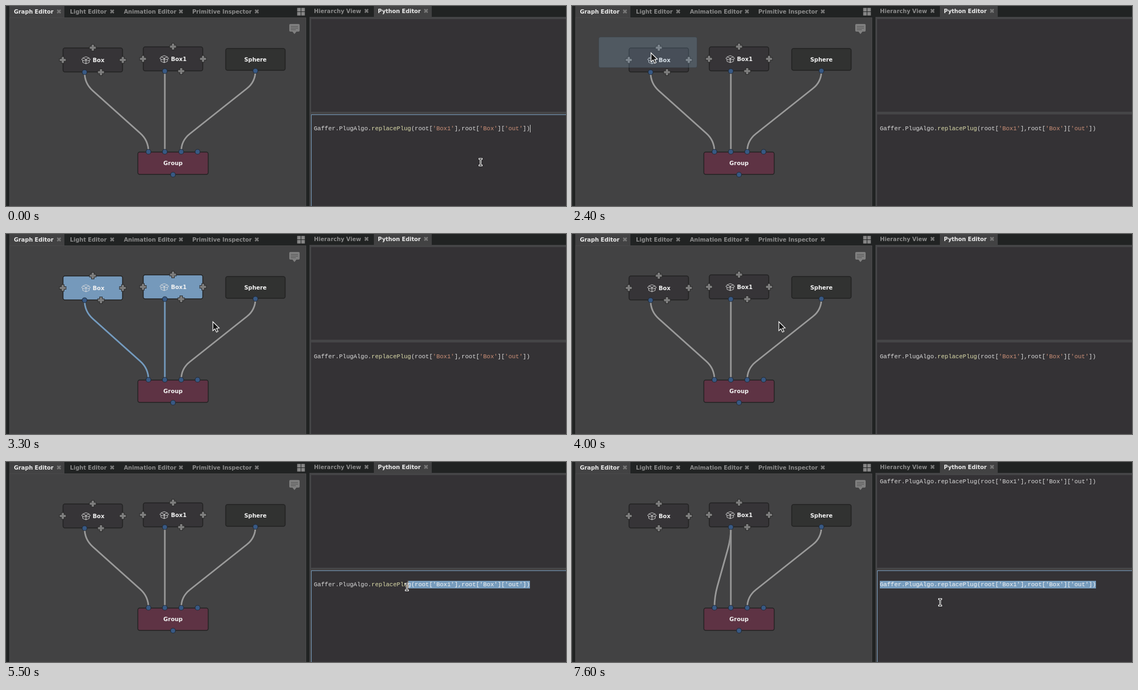
An HTML page with a canvas that plays this animation: 1026 by 367 pixels, repeating every 8000 ms.

```html
<!DOCTYPE html>
<html lang="en">
<head>
<meta charset="utf-8">
<title>Graph and Python editors</title>
<style>
html, body { margin: 0; width: 100%; height: 100%; overflow: hidden; background: #212323; }
canvas { display: block; }
</style>
</head>
<body>
<canvas id="stage" width="1026" height="367"></canvas>
<script>
const g = document.getElementById('stage').getContext('2d');
const LOOP = 8000, STEP = 100;
const UI = '"DejaVu Sans", sans-serif';
const MONO = '11px "Liberation Mono", monospace';
const PANEL = '#424243', FIELD = '#343235', DARK = '#212323', BLUE = '#779cbd';
const CODE_X = 564, CHAR = 6.6;

const CODE_COLOR = { plain: '#dcdcdc', call: '#dcdcaa', string: '#ce9178' };
const LINE = "Gaffer.PlugAlgo.replacePlug(root['Box1'],root['Box']['out'])";
const TOKENS = LINE.split(/('\w+'|\w+(?=\())/);

// Pointer moves: start and end time, and where it goes
const HOME = { x: 869, y: 286 };
const MOVES = [
  { from: 400, to: 1100, x: 995, y: 252 },
  { from: 1400, to: 1700, x: 352, y: 140 },
  { from: 1700, to: 2300, x: 48, y: 55 },
  { from: 2300, to: 2800, x: 379, y: 161 },
  { from: 4300, to: 4700, x: 1019, y: 274 },
  { from: 4900, to: 5000, x: 1014, y: 235 },
  { from: 5000, to: 5200, x: 988, y: 236 },
  { from: 5300, to: 5800, x: 523, y: 224 },
  { from: 6000, to: 6200, x: 674, y: 257 }
];

const clamp = (v, lo, hi) => Math.max(lo, Math.min(hi, v));
const easeOut = k => 1 - (1 - k) ** 1.55;

function pointer(t) {
  let { x, y } = HOME;
  for (const m of MOVES) {
    const k = easeOut(clamp((t - m.from) / (m.to - m.from), 0, 1));
    x += (m.x - x) * k;
    y += (m.y - y) * k;
  }
  return { x, y };
}

function rect(x, y, w, h, color) {
  g.fillStyle = color;
  g.fillRect(x, y, w, h);
}

function line(color, width) {
  g.strokeStyle = color;
  g.lineWidth = width;
  g.stroke();
}

function rounded(x, y, w, h, r, fill) {
  g.beginPath();
  g.roundRect(x, y, w, h, r);
  g.fillStyle = fill;
  g.fill();
}

function text(str, x, y, color, font) {
  g.font = font;
  g.fillStyle = color;
  g.fillText(str, x, y);
}

function tab(label, x, y, closeX, active) {
  text(label, x, y + 4, active ? '#ececec' : '#8b8b8b', 'bold 10.15px ' + UI);
  g.beginPath();
  for (const s of [-3, 3]) {
    g.moveTo(closeX - 3, y - s);
    g.lineTo(closeX + 3, y + s);
  }
  line('#777777', 2.6);
}

function noteIcon() {
  rounded(519, 33, 19, 14, 2, '#7f7f7f');
  g.beginPath();
  g.moveTo(524, 46); g.lineTo(533, 46); g.lineTo(528.5, 51.5);
  g.fill();
  for (let i = 0; i < 3; i++) rect(522, 37 + 3 * i, i < 2 ? 13 : 9, 1, '#555555');
}

function panels(focus) {
  rect(0, 0, 1026, 367, DARK);
  rect(0, 0, 1, 367, '#2c2e2e');
  rect(6, 0, 101, 22, PANEL);
  rect(6, 21, 544, 346, '#49494a');
  rect(7, 22, 542, 345, PANEL);
  tab('Graph Editor', 14.5, 10, 97, true);
  tab('Light Editor', 117.3, 10, 194.5, false);
  tab('Animation Editor', 216, 10, 320.5, false);
  tab('Primitive Inspector', 341.2, 10, 459.5, false);
  for (const i of [0, 1]) for (const j of [0, 1]) rect(533.5 + 7.5 * i, 3.5 + 7.5 * j, 6.5, 6.5, '#858585');
  noteIcon();

  rect(556, 20, 470, 347, '#454547');
  rect(674, 0, 106, 21, PANEL);
  tab('Hierarchy View', 564.3, 9, 660.5, false);
  tab('Python Editor', 681.3, 9, 769.5, true);
  rect(559, 24, 467, 170, FIELD);
  rect(559, 199, 467, 168, focus ? BLUE : FIELD);
  rect(560, 200, 466, 167, FIELD);
}

// Straight run between two rounded ends that leave the ports vertically
function wire(x0, y0, x1, y1, lit) {
  const bend = 20, dx = x1 - x0, dy = y1 - y0 - 2 * bend;
  const k = bend / Math.hypot(dx, dy);
  g.beginPath();
  g.moveTo(x0, y0);
  g.quadraticCurveTo(x0, y0 + bend, x0 + dx * k, y0 + bend + dy * k);
  g.lineTo(x1 - dx * k, y1 - bend - dy * k);
  g.quadraticCurveTo(x1, y1 - bend, x1, y1);
  line('rgba(40,40,40,.3)', 4);
  line(lit ? '#749abd' : '#999999', 3);
}

function port(x, y) {
  g.beginPath();
  g.arc(x, y, 4.5, 0, 7);
  g.fillStyle = '#385984';
  g.fill();
  line('#222b38', 1.2);
}

function plus(x, y) {
  for (const [pad, color] of [[1, '#2a2a2a'], [0, '#7d7d7d']]) {
    const a = 5.5 + pad, b = 2 + pad;
    rect(x - a, y - b, 2 * a, 2 * b, color);
    rect(x - b, y - a, 2 * b, 2 * a, color);
  }
}

// Open box: body, rim and two front flaps, mirrored
function crate(x, y) {
  g.save();
  g.translate(x, y);
  g.lineJoin = 'round';
  g.beginPath();
  for (const s of [-1, 1]) {
    g.moveTo(0, -6);
    g.lineTo(6 * s, -3.5);
    g.lineTo(0, -1);
    g.lineTo(2.5 * s, 2);
    g.lineTo(8 * s, -0.5);
    g.lineTo(6 * s, -3.5);
    g.moveTo(6 * s, 1);
    g.lineTo(6 * s, 4.5);
    g.lineTo(0, 7);
    g.lineTo(0, -1);
  }
  line('#dedede', 0.9);
  g.restore();
}

function node(cx, cy, w, h, label, fill, icon) {
  rounded(cx - w / 2 + 0.5, cy - h / 2 + 0.5, w - 1, h - 1, 3.5, fill);
  line('#222222', 1.5);
  const font = 'bold 10.3px ' + UI, gap = icon ? 21 : 0;
  g.font = font;
  const x = cx - (g.measureText(label).width + gap) / 2;
  if (icon) crate(x + 8.8, cy);
  text(label, x + gap, cy + 3.7, '#f2f2f2', font);
}

function graph(boxOn, box1On, replaced) {
  const boxFill = on => on ? '#7599bb' : '#363437';
  if (replaced) wire(291, 120, 261, 267, false);
  else wire(144, 122, 261, 267, boxOn);
  wire(291, 120, 291, 267, box1On);
  wire(457, 119, 321, 267, false);

  node(159, 99, 110, 45, 'Box', boxFill(boxOn), true);
  node(306, 97, 110, 45, 'Box1', boxFill(box1On), true);
  node(457, 98, 110, 41, 'Sphere', '#313231', false);
  node(306, 288.5, 130, 42, 'Group', '#5e3344', false);

  for (const [cx, cy, low] of [[159, 99, replaced ? 0 : 15], [306, 97, 15]]) {
    plus(cx, cy - 22.5);
    plus(cx - 55, cy);
    plus(cx + 55, cy);
    plus(cx + low, cy + 22.5);
    if (low) port(cx - low, cy + 22.5);
  }
  port(457, 119);
  for (let i = 0; i < 4; i++) port(261 + 30 * i, 267.5);
  port(306, 309.5);
}

function code(start) {
  let x = CODE_X;
  for (const str of TOKENS) {
    const kind = str[0] === "'" ? 'string' : str === 'replacePlug' ? 'call' : 'plain';
    text(str, x, 228, CODE_COLOR[kind], MONO);
    x += str.length * CHAR;
  }
  if (start >= LINE.length) return;
  const left = CODE_X + start * CHAR;
  rect(left, 218, x - left, 14, BLUE);
  text(LINE.slice(start), left, 228, '#f4f4f4', MONO);
}

function beam(px, py) {
  const x = Math.round(px) + 0.5, y = Math.round(py) + 0.5;
  g.beginPath();
  for (const s of [-6, 6]) {
    g.moveTo(x - 2, y + s);
    g.lineTo(x + 2, y + s);
  }
  g.moveTo(x, y - 6);
  g.lineTo(x, y + 6);
  g.lineCap = 'square';
  line('#ffffff', 3);
  line('#151515', 1);
  g.lineCap = 'butt';
}

function arrow(x, y) {
  g.beginPath();
  [[0, 0], [0, 16.5], [3.8, 13], [6.6, 19], [9.4, 17.7], [6.7, 12], [11.6, 11.6]]
    .forEach(([dx, dy]) => g.lineTo(x + dx, y + dy));
  g.closePath();
  g.fillStyle = '#151515';
  g.fill();
  line('#ffffff', 1.2);
}

function draw(now) {
  const t = Math.floor((now % LOOP) / STEP) * STEP;
  const focus = t < 2300 || t >= 5100;
  const p = pointer(t);
  const band = pointer(t + STEP); // the band runs one step ahead of the drawn pointer
  const picked = t >= 2400 && t < 4000;
  const replaced = t >= 7500;

  panels(focus);
  graph(picked && band.x > 214 && band.y > 121, picked && band.x > 361, replaced);
  if (t >= 2400 && t < 3300) {
    rounded(49, 57, band.x - 49, band.y - 57, 3, 'rgba(119,156,189,.25)');
    line('rgba(50,60,68,.4)', 1);
  }

  if (replaced) text(LINE, CODE_X, 39, CODE_COLOR.plain, MONO);
  const start = t < 5400 ? LINE.length
    : t >= 5800 ? 0
    : clamp(Math.round((p.x - CODE_X) / CHAR), 0, LINE.length);
  code(start);

  const blink = t < 5100 ? t : t - 5100;
  if (focus && Math.floor(blink / 500) % 2 === 0)
    rect(Math.round(CODE_X + start * CHAR), 218, 1, 14, start < LINE.length ? '#886342' : '#cbcdca');

  if (t >= 5400 || (p.x > 559 && p.y > 24)) beam(p.x, p.y);
  else arrow(p.x, p.y);
}

const begin = performance.now();
function tick() {
  draw(performance.now() - begin);
  requestAnimationFrame(tick);
}
tick();
</script>
</body>
</html>
```
